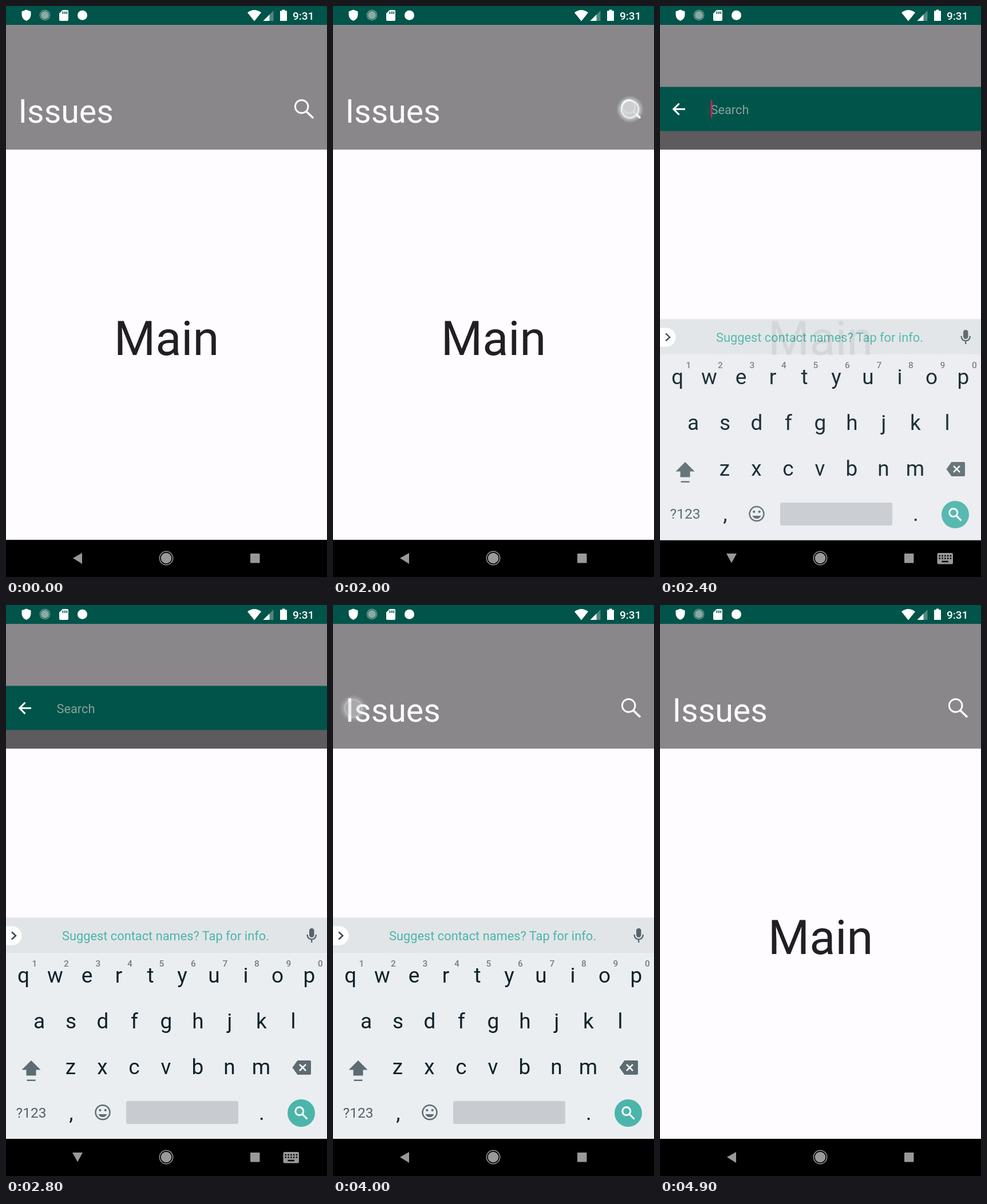
An HTML page that plays this animation: 561x998 px, repeating every 5 s.

```html
<!DOCTYPE html>
<html lang="en">
<head>
<meta charset="utf-8">
<title>Search bar reveal</title>
<style>
  html, body { margin: 0; width: 100%; height: 100%; overflow: hidden; background: #fefcff; }
  svg { display: block; width: 561px; height: 998px; font-family: Roboto, sans-serif; }
  .mid { text-anchor: middle; }
  .line { fill: none; stroke: #fff; stroke-width: 3; }
  .letters { font-size: 37px; fill: #0f2229; }
  .hints { font-size: 15.5px; font-weight: 500; fill: #737d82; }
</style>
</head>
<body>
<svg viewBox="0 0 561 998">
  <defs>
    <clipPath id="reveal"><circle id="hole" cx="520" cy="180"/></clipPath>
    <radialGradient id="glow">
      <stop offset=".55" stop-color="#d4d5d6" stop-opacity=".9"/>
      <stop offset=".62" stop-color="#fff" stop-opacity=".95"/>
      <stop offset=".72" stop-color="#e8f2f4" stop-opacity=".5"/>
      <stop offset="1" stop-color="#dcebee" stop-opacity="0"/>
    </radialGradient>
  </defs>

  <rect width="561" height="998" fill="#fefcff"/>
  <text class="mid" x="280.5" y="610" font-size="83" fill="#211f24">Main</text>

  <!-- header -->
  <rect y="33" width="561" height="218" fill="#8a878a"/>
  <text x="21.5" y="204" font-size="57.3" fill="#fefcff">Issues</text>
  <g class="line">
    <circle cx="516.7" cy="175.8" r="11.3"/>
    <path d="M525 184.500L537 196" stroke-width="3.800"/>
  </g>
  <rect id="scrim" y="141.500" width="561" height="109.500"/>
  <g clip-path="url(#reveal)">
    <rect y="141.500" width="561" height="77" fill="#00544a"/>
    <path class="line" d="M44 180.300H24M33.500 170.500L23.700 180.300L33.500 190.100" stroke-width="2.700"/>
    <text x="88.500" y="188.700" font-size="21.800" fill="#8c9f9b">Search</text>
    <rect id="cursor" x="88.700" y="165" width="2.600" height="30" fill="#e0195a"/>
  </g>
  <circle id="touch" cy="180.500" r="24" fill="url(#glow)"/>

  <!-- status bar -->
  <rect width="561" height="33" fill="#00544a"/>
  <g fill="#fff">
    <path d="M35.500 6.500L43.500 9.500V15.500Q43 23 35.500 26Q28 23 27.500 15.500V9.500Z"/>
    <circle cx="68" cy="16" r="7" fill="#8ba9a4"/>
    <circle cx="68" cy="16" r="8.500" fill="none" stroke="#b4c8c4" stroke-width="1.500" stroke-dasharray="1.500 1"/>
    <path d="M99 7H107Q109 7 109 9V24Q109 26 107 26H95Q93 26 93 24V13Z"/>
    <path d="M99.500 9.500V14M103 9.500V14M106.300 9.500V14" stroke="#00544a" stroke-width="1.700"/>
    <circle cx="133.500" cy="16.300" r="8.500"/>
    <path d="M422 11.500Q434 2.500 446 11.500L434 26.500Z"/>
    <path d="M467.500 8V26H449.500Z" opacity=".3"/>
    <path d="M460.500 15V26H449.500Z"/>
    <path d="M482.500 6.500H487.500V8.500H491V26H479V8.500H482.500Z"/>
    <text x="538.500" y="23.700" text-anchor="end" font-size="19.100" font-weight="500">9:31</text>
  </g>

  <rect y="933" width="561" height="65"/>

  <g id="keyboard">
    <rect y="545.500" width="561" height="2" fill="#000" opacity=".05"/>
    <rect y="547" width="561" height="62" fill="#e1e5e8"/>
    <rect y="608" width="561" height="325" fill="#ebeef1"/>
    <rect y="933" width="561" height="65"/>
    <rect x="-20" y="561.500" width="47.500" height="33" rx="16.500" fill="#fff"/>
    <path class="line" d="M10 571.500L17 578L10 584.500" stroke="#37474f" style="stroke:#37474f;stroke-width:2.500"/>
    <text class="mid" x="279" y="586" font-size="21.800" fill="#4cb5a9">Suggest contact names? Tap for info.</text>
    <rect x="530" y="565" width="8.500" height="16" rx="4.200" fill="#566369"/>
    <path d="M526.500 576Q527 584.300 534.200 584.300T542 576M534.200 584V590" fill="none" stroke="#566369" stroke-width="2.300"/>
    <g id="keys" class="mid"></g>
    <g fill="#5d6b72">
      <path d="M44 796L60.500 812.500H52.500V822.500H35.500V812.500H27.500Z"/>
      <path d="M36.500 829.500H51.500V832H36.500Z"/>
      <path d="M509.500 796H531Q533 796 533 798V819Q533 821 531 821H509.500L500.500 808.500Z"/>
      <circle cx="164.300" cy="883" r="2.100"/>
      <circle cx="173.700" cy="883" r="2.100"/>
      <path d="M161.500 890H176.500Q174.500 895 169 895T161.500 890Z"/>
    </g>
    <circle cx="169" cy="886.700" r="12.500" fill="none" stroke="#5d6b72" stroke-width="2.500"/>
    <path class="line" d="M513 803L524 814M524 803L513 814" style="stroke-width:2.500"/>
    <text class="mid" x="44" y="895.500" font-size="24.500" fill="#526169">?123</text>
    <rect x="210" y="867" width="196" height="40" rx="3" fill="#c8ccd0"/>
    <circle cx="516" cy="888" r="24" fill="#4cb5ab"/>
    <circle class="line" cx="512.800" cy="884.700" r="7"/>
    <path class="line" d="M518 890L526.500 898.500"/>
  </g>

  <!-- navigation bar -->
  <g fill="#999">
    <path id="back"/>
    <circle cx="280" cy="965" r="9.300"/>
    <circle cx="280" cy="965" r="11.700" fill="none" stroke="#999" stroke-width="1.500"/>
    <rect x="427" y="957" width="16.500" height="16.500" rx="1"/>
    <g id="imeSwitch">
      <rect x="484.500" y="956" width="27.500" height="19.500" rx="2.500"/>
      <path d="M487.500 961H509.500M487.500 965.500H509.500" stroke="#000" stroke-width="2.500" stroke-dasharray="2.500 2.300"/>
      <path d="M492.500 971H504" stroke="#000" stroke-width="2.500"/>
    </g>
  </g>
</svg>
<script>
const LOOP = 5000, STEP = 100;
const $ = id => document.getElementById(id);
const set = (id, attrs) => Object.entries(attrs).forEach(([k, v]) => $(id).setAttribute(k, v));
const ramp = (t, from, to) => Math.min(1, Math.max(0, (t - from) / (to - from)));
const pulse = (t, inFrom, inTo, outFrom, outTo) => ramp(t, inFrom, inTo) - ramp(t, outFrom, outTo);
const smooth = u => (1 - Math.cos(Math.PI * u)) / 2;

function addRow(chars, x, y, kind = 'letters') {
  [...chars].forEach((char, i) => {
    const key = document.createElementNS('http://www.w3.org/2000/svg', 'text');
    key.setAttribute('class', kind);
    key.setAttribute('x', x + 55.5 * i);
    key.setAttribute('y', y);
    key.textContent = char;
    $('keys').append(key);
  });
}
addRow('qwertyuiop', 30.5, 660);
addRow('1234567890', 50, 632, 'hints');
addRow('asdfghjkl', 58, 740);
addRow('zxcvbnm', 113, 820);
addRow(',', 114, 899.5);
addRow('.', 447, 899.5);

function draw(t) {
  set('hole', { r: 556 * smooth(pulse(t, 2050, 2300, 3750, 3960)) });
  set('scrim', { opacity: 0.33 * pulse(t, 2050, 2180, 3770, 3960) });
  set('cursor', { opacity: t % 1000 < 500 ? 1 : 0 });

  const opening = t < 3000;
  const press = opening
    ? pulse(t, 1850, 1970, 2060, 2210)
    : pulse(t, 3540, 3660, 3900, 4090);
  set('touch', {
    cx: opening ? 519 : 35.5,
    opacity: opening && t >= 2200 && t < 2300 ? 0.1 : press
  });

  // the keyboard slides and fades, decelerating in and accelerating out
  const enter = 1 - ramp(t, 2253, 2503), leave = ramp(t, 4000, 4150);
  set('keyboard', {
    transform: `translate(0 ${77 * (enter ** 5 + leave ** 5)})`,
    opacity: Math.max(0, 1 - enter ** 3 - leave ** 3)
  });

  const typing = t >= 2150 && t < 3950;
  set('back', { d: typing ? 'M116 957H134L125 973.5Z' : 'M117 965L133 956V975Z' });
  set('imeSwitch', { opacity: typing ? 1 : 0 });
}

const start = performance.now();
function tick() {
  const t = (performance.now() - start) % LOOP;
  draw(Math.floor(t / STEP) * STEP);
  requestAnimationFrame(tick);
}
tick();
</script>
</body>
</html>
```
